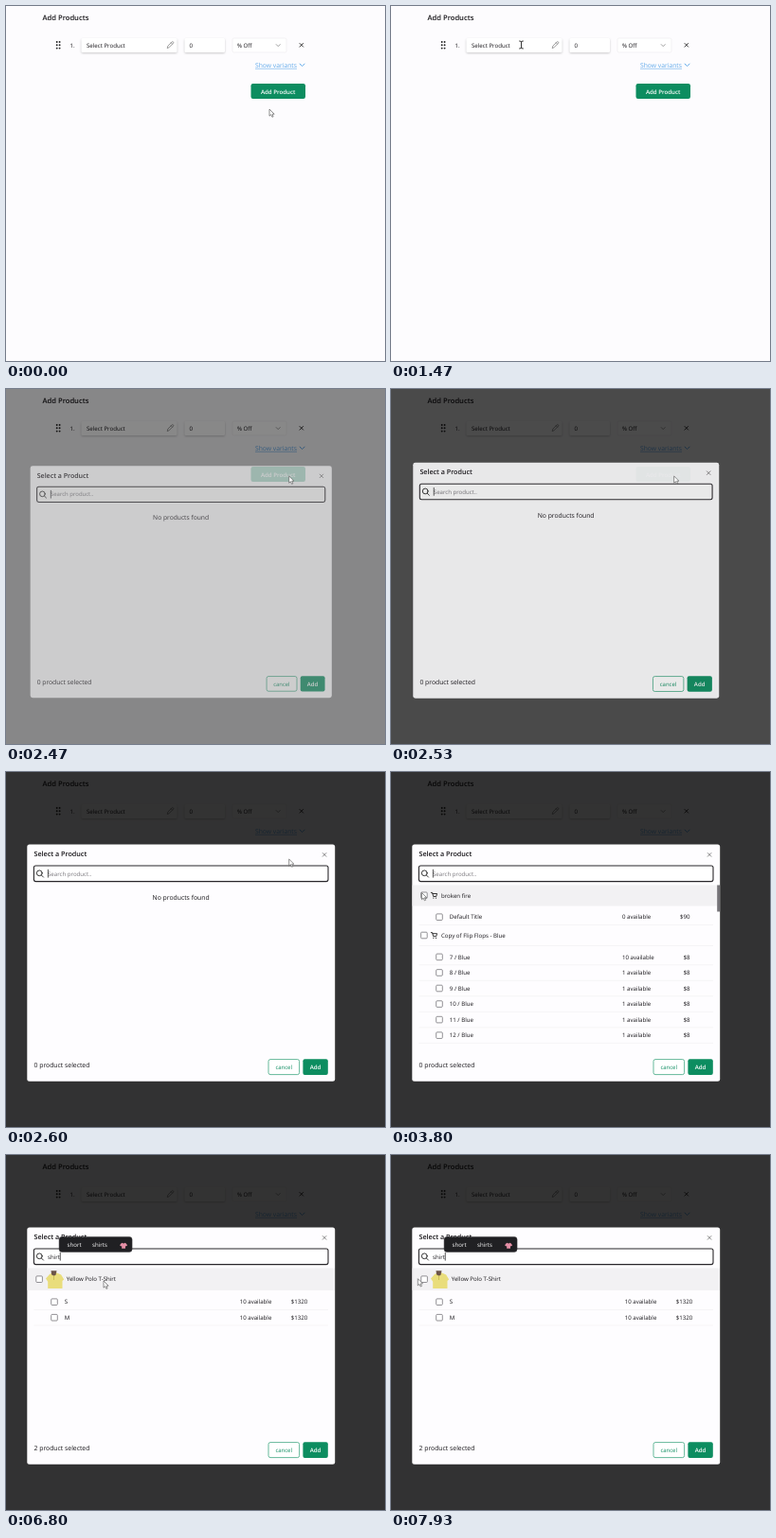
Recreate the animation shown at these times as an HTML page. Size 400 by 375 pixels, loop 8000 ms.

```html
<!DOCTYPE html>
<html lang="en">
<head>
<meta charset="utf-8">
<title>Add Products</title>
<style>
html, body { margin: 0; width: 100%; height: 100%; overflow: hidden; background: #fdfcfe; }
svg { display: block; width: 100%; height: 100%; }
text { font: 6.12px "Open Sans", "Noto Sans", sans-serif; fill: #161418; text-rendering: geometricPrecision; white-space: pre; }
.bold { font-weight: 600; }
.big { font-size: 6.85px; }
.end { text-anchor: middle; }
.right { text-anchor: end; }
.line { fill: none; stroke: #222; stroke-width: .9; stroke-linecap: round; stroke-linejoin: round; }
.field { fill: #fff; filter: drop-shadow(0 1.2px 1.3px #0003); }
</style>
</head>
<body>
<svg viewBox="0 0 400 375">
  <rect width="400" height="375" fill="#fdfcfe"/>
  <text class="bold" x="38.5" y="15.4" style="font-size:7.6px">Add Products</text>
  <path d="M53.7 38v.01M53.7 41.3v.01M53.7 44.6v.01M56.6 38v.01M56.6 41.3v.01M56.6 44.6v.01" class="line" style="stroke-width:1.9"/>
  <text x="67.5" y="43.8">1.</text>
  <rect class="field" x="79.5" y="34" width="101" height="15" rx="1.5"/>
  <text x="85" y="43.8">Select Product</text>
  <path class="line" style="stroke:#777;stroke-width:.7" d="M170.3 44.2l.5-2 4.3-4.3q.8-.6 1.4 0t0 1.4l-4.3 4.3zM174.2 38.8l1.4 1.4"/>
  <rect class="field" x="188.5" y="34" width="42.5" height="15" rx="1.5"/>
  <text x="193.5" y="43.8">0</text>
  <rect x="239" y="34" width="57" height="15" rx="1.5" fill="#fff" stroke="#eeecef" stroke-width=".7"/>
  <text x="244" y="43.8">% Off</text>
  <path class="line" style="stroke:#777;stroke-width:.7" d="M285.2 40.6l2 2 2-2"/>
  <path class="line" d="M310 39.5l3.6 3.6M313.6 39.5l-3.6 3.6"/>
  <g stroke="#62aaea">
    <text x="263" y="64.8" style="font-size:6.75px;fill:#62aaea" stroke="none">Show variants</text>
    <path d="M263 66.3H307" stroke-width=".6"/>
    <path d="M309.8 60.8l2.8 2.8 2.8-2.8" fill="none" stroke-width="1"/>
  </g>
  <rect id="addBtn" x="258.5" y="82" width="57.5" height="16" rx="2.2"/>
  <text class="bold end" x="287.2" y="92.5" style="fill:#fff">Add Product</text>

  <rect id="shade" width="400" height="375"/>

  <g id="modal">
    <rect x="22.3" y="76.5" width="324.9" height="250.3" rx="2.5" fill="#fefdff"/>
    <text class="bold" x="29.5" y="89.2" style="font-size:7.2px">Select a Product</text>
    <path class="line" style="stroke:#555;stroke-width:.7" d="M334.3 85.6l3.6 3.6M337.9 85.6l-3.6 3.6"/>
    <rect id="search" x="29.4" y="99" width="310.6" height="16.6" rx="2" fill="#fff"/>
    <g class="line"><circle cx="35.3" cy="106.8" r="2.9"/><path d="M37.4 109l2.1 2.1"/></g>
    <text id="query" x="44" y="109.5"></text>
    <path id="caret" stroke="#111" stroke-width=".7"/>
    <g id="list"></g>
    <text id="count" class="big" x="29.5" y="311.8"></text>
    <rect x="277" y="303.6" width="32.6" height="16" rx="2" fill="#fff" stroke="#3fa780" stroke-width=".8"/>
    <text class="end" x="293.2" y="313.9" style="fill:#0d8d60;font-weight:500;font-size:6px">cancel</text>
    <rect x="313.4" y="303.3" width="26.4" height="16.6" rx="2" fill="#0d8d60"/>
    <text class="bold end" x="326.5" y="313.9" style="fill:#fff">Add</text>
  </g>

  <g id="popup">
    <rect y="86.4" width="77" height="16" rx="3" fill="#202023" stroke="#3a393d" stroke-width=".5"/>
    <text x="8.5" y="96.8" style="fill:#fff">short</text>
    <text x="35" y="96.8" style="fill:#fff">shirts</text>
    <path d="M65.6 93.2l-1.6 2 1.2 1.2.9-.5v2.9h3.8v-2.9l.9.5 1.2-1.2-1.6-2-1.3-.4-1.1 1-1.1-1z" fill="#e58fa6"/>
  </g>

  <path id="arrow" d="M0 0V7.2L1.7 5.7 2.9 8.3 4.1 7.8 3 5.2H5.2Z" fill="#fff" stroke="#555" stroke-width=".65" stroke-linejoin="round"/>
  <path id="beam" class="line" d="M-1.9-4Q0-4 0-3Q0-4 1.9-4M0-3V3M-1.9 4Q0 4 0 3Q0 4 1.9 4"/>
</svg>
<script>
const LOOP = 8000, OPEN = 2400, LOADED = 3000, FOUND = 6730;
const BLUR = 3930, CHECK1 = 4000, CHECK2 = 4900, REFOCUS = 5600;
const keyTimes = [5930, 6070, 6270, 6400, 6600];
const path = [ // time, x, y
  [0, 278, 109], [70, 278, 109], [230, 311, 62], [400, 200, 14], [620, 46, 38], [870, 113, 40],
  [1200, 128, 40], [1470, 137.5, 41], [1730, 289, 85], [1870, 298.7, 92], [2670, 298.7, 92],
  [2900, 288, 73], [3200, 150, 112], [3470, 40, 125], [3800, 32.5, 127.5], [4400, 33, 128],
  [4550, 114, 150], [4730, 33, 173], [5000, 33, 173], [5500, 100, 106], [5670, 104, 103.5],
  [5900, 104, 103.5], [6150, 103, 165], [6500, 103, 133], [7000, 103, 133], [7400, 32, 137],
  [7600, 19, 136], [7800, 23, 133], [7930, 28.3, 130.7], [LOOP, 28.3, 130.7]
];
const $ = id => document.getElementById(id);
const set = (id, attrs) => { for (const k in attrs) $(id).setAttribute(k, attrs[k]); };
const show = (id, on) => $(id).style.display = on ? "" : "none";
const inside = ([x, y], l, t, r, b) => x > l && x < r && y > t && y < b;

const label = (x, y, s, cls = "") => `<text x="${x}" y="${y + 2.2}" class="${cls}">${s}</text>`;
const rule = y => `<path d="M29.5 ${y}H340" stroke="#f2f1f3" stroke-width=".7"/>`;
const box = (x, y, on) =>
  `<rect x="${x}" y="${y - 3.3}" width="6.6" height="6.6" rx="1" fill="${on ? "#1b72dd" : "#fff"}" stroke="${on ? "#1b72dd" : "#77757a"}" stroke-width=".8"/>` +
  (on ? `<path class="line" style="stroke:#fff" d="M${x + 1.5} ${y + .1}l1.4 1.5 2.4-3.1"/>` : "");
const cart = y => `<g class="line" transform="translate(42.3 ${y - 3.2})"><path d="M0 .3H1.3L2.4 4.4H5.4L6.3 1.4H1.7"/><path d="M2.6 6v.01M5.2 6v.01" stroke-width="1.2"/></g>`;
const band = h => `<rect x="22.6" y="119.5" width="324.3" height="${h}" fill="#f2f1f3"/>`;
const variant = (y, name, stock, price, shift = 0) =>
  box(47.7, y, false) + label(61.8, y, name) + label(244 + shift, y, stock + " available") +
  label(315.5 + shift, y, "$" + price, "right") + rule(y + 8.3);
const product = (y, name, on) => box(31.6, y, on) + cart(y) + label(53, y, name);

function catalog(first, second) {
  let s = band(22) + product(130.3, "broken fire", first) + variant(153.2, "Default Title", 0, 90) +
    product(172.5, "Copy of Flip Flops - Blue", second) + rule(183.5);
  for (let n = 7; n <= 12; n++) s += variant(195.4 + (n - 7) * 16.55, n + " / Blue", n == 7 ? 10 : 1, 8);
  return s + '<rect x="344.2" y="119.5" width="2.9" height="28" fill="#747277"/>';
}
const shirt = `<path d="M46 126l-4 4.5 2.2 3.2V141H59.5V133l1.7-1.5-3-5-5-2.2h-4z" fill="#e9dd7c"/>
  <path d="M47.5 122.3h6l-1 4.5-2 1-2.5-1.5z" fill="#6b5348"/><path d="M50.5 127.5V132" stroke="#c5b752" stroke-width=".8"/>`;
const results = band(23.5) + box(31.8, 131.2, false) + shirt + label(63.8, 131.2, "Yellow Polo T-Shirt") +
  variant(155.2, "S", 10, 1320, 2.7) + variant(171.7, "M", 10, 1320, 2.7);

function cursorAt(t) {
  const i = path.findIndex(k => k[0] > t), [t0, x0, y0] = path[i - 1], [t1, x1, y1] = path[i];
  const u = (t - t0) / (t1 - t0), e = u * u * (3 - 2 * u);
  return [x0 + (x1 - x0) * e, y0 + (y1 - y0) * e];
}

let lastList;
function draw(t) {
  const pos = cursorAt(t), open = t >= OPEN;
  const u = Math.min(1, Math.max(0, (t - OPEN) / 200)), p = 1 - (1 - u) ** 2;
  set("addBtn", { fill: !open && inside(pos, 258, 82, 316, 98) || open && t < 2600 ? "#259a71" : "#0d8d60" });
  set("shade", { opacity: .8 * p });
  set("modal", {
    opacity: p,
    transform: `translate(184.7 ${201.6 + 5 * (1 - p)}) scale(${.95 + .05 * p}) translate(-184.7 -201.6)`
  });

  const typed = keyTimes.filter(k => k <= t).length;
  const focused = t < BLUR || t >= REFOCUS;
  set("search", { stroke: focused ? "#29272b" : "#dddbe0", "stroke-width": focused ? 1.1 : .7 });
  $("query").textContent = typed ? "shirt".slice(0, typed) : "Search product..";
  $("query").style.fill = typed ? "#161418" : "#77757a";
  const caret = 44.4 + (typed ? $("query").getComputedTextLength() : 0);
  const since = t - (typed ? keyTimes[typed - 1] : t >= REFOCUS ? REFOCUS : OPEN);
  set("caret", { d: `M${caret} 102.8V111.6` });
  show("caret", focused && since % 1060 < 530);
  show("popup", typed > 1);
  set("popup", { transform: `translate(${caret - 1.2} 0)` });

  const selected = (t >= CHECK1) + (t >= CHECK2);
  $("count").textContent = selected + " product selected";
  const list = t >= FOUND ? results : t >= LOADED ? catalog(t >= CHECK1, t >= CHECK2) :
    '<text class="big end" x="184.6" y="134.6">No products found</text>';
  if (list !== lastList) $("list").innerHTML = lastList = list;

  const text = open ? inside(pos, 29, 98.5, 340, 116)
    : inside(pos, 79, 34, 181, 49) || inside(pos, 188, 34, 231, 49);
  const place = { transform: `translate(${pos})` };
  set("arrow", place);
  set("beam", place);
  show("arrow", !text);
  show("beam", text);
}

const start = performance.now();
function tick() {
  draw((performance.now() - start) % LOOP);
  requestAnimationFrame(tick);
}
tick();
</script>
</body>
</html>
```
